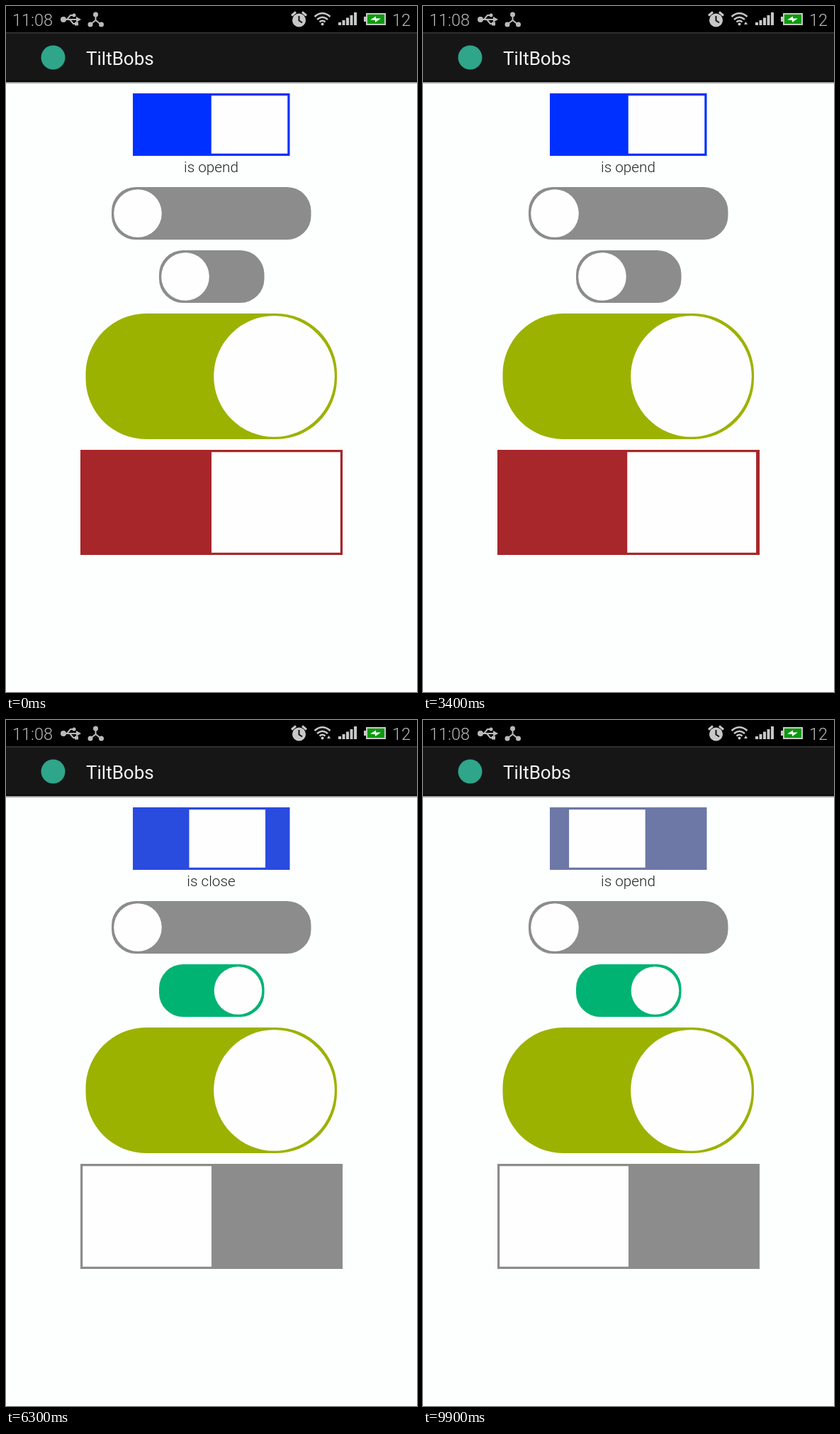
Animation, 580 px wide and 966 px high, one loop 10 s. Source, as an HTML page:

```html
<!DOCTYPE html>
<html lang="en">
<head>
<meta charset="utf-8">
<title>Toggle buttons</title>
<style>
  html, body { margin: 0; width: 100%; height: 100%; overflow: hidden; background: #fdfefe; }
  svg { display: block; width: 100vw; height: 100vh; }
  text { font-family: Roboto, "Open Sans", sans-serif; font-weight: 300; }
</style>
</head>
<body>
<svg viewBox="0 0 580 966">
  <defs>
    <linearGradient id="shade" x2="0" y2="1">
      <stop offset="0" stop-color="#777"/>
      <stop offset="1" stop-color="#fdfefe"/>
    </linearGradient>
  </defs>
  <rect width="580" height="966" fill="#fdfefe"/>
  <rect width="580" height="38" fill="#000"/>
  <rect y="38" width="580" height="69" fill="#161616"/>
  <rect y="37" width="580" height="1.5" fill="#383838"/>
  <rect y="105" width="580" height="2" fill="#0a0a0a"/>
  <rect y="107" width="580" height="3" fill="url(#shade)"/>

  <g fill="#bababa" font-size="23.5">
    <text x="9" y="28">11:08</text>
    <text x="545" y="28">12</text>
  </g>

  <g stroke="#bababa" stroke-width="2" fill="none">
    <path d="M82 19H100M86 19L91 13H95M90 19L95 25H98"/>
    <path d="M126.5 13V20L119 26M126.5 20L134 26"/>
  </g>
  <g fill="#bababa">
    <circle cx="81" cy="19" r="4"/>
    <path d="M99 15L106 19L99 23Z"/>
    <circle cx="96" cy="13" r="2.5"/>
    <rect x="97" y="22.5" width="5" height="5"/>
    <circle cx="126.5" cy="12" r="3.5"/>
    <circle cx="119" cy="26" r="3.5"/>
    <circle cx="134.5" cy="26" r="3.5"/>
  </g>

  <g stroke="#c8c8c8" fill="none">
    <circle cx="413.5" cy="20" r="9.5" fill="#c8c8c8" stroke="none"/>
    <path d="M403 13.5L409 8.5M424 13.5L418 8.5" stroke-width="3"/>
    <path d="M413.5 14V20.5L418 23.5" stroke="#111" stroke-width="2"/>
    <path d="M435.5 15Q446.500 5.500 457.500 15M439 19Q446.500 12.500 454 19M442.500 22.500Q446.500 19 450.500 22.500" stroke-width="2.500"/>
    <circle cx="446.500" cy="25.500" r="2" fill="#c8c8c8" stroke="none"/>
  </g>
  <path id="traffic" fill="#c8c8c8"/>
  <g id="bars" fill="#c8c8c8"></g>
  <path d="M505 15H508V10H536V27H508V22H505Z" fill="#c8c8c8"/>
  <rect x="510" y="12" width="24" height="13" fill="#0a9a0a"/>
  <path d="M514 19.500L522 14.500V17.500H529L521 23V20Z" fill="#fff"/>

  <circle cx="66.500" cy="72.500" r="17" fill="#2fa58a"/>
  <text x="113" y="83" font-size="26" fill="#f3f3f3" style="font-weight:400">TiltBobs</text>

  <g id="toggles"></g>
  <text id="label" x="289.500" y="234" font-size="20.700" fill="#222" text-anchor="middle"></text>
</svg>
<script>
const LOOP = 10000, STEP = 100, SLIDE = 320, PAD = 3.2;
const OFF = [140, 140, 140];
const $ = id => document.getElementById(id);

// flips: times at which the switch starts sliding to its other side
const toggles = [
  { x: 179, y: 123, w: 221.5, h: 88, color: [0, 48, 255], on: 1, flips: [5580, 6096, 9680] },
  { x: 149, y: 255, w: 281.5, h: 74, color: [0, 80, 0], on: 0, round: true, flips: [7180, 7640, 8080, 8780] },
  { x: 216, y: 344, w: 148.5, h: 74, color: [0, 179, 115], on: 0, round: true, flips: [4180] },
  { x: 112.5, y: 433, w: 354.5, h: 177, color: [156, 178, 0], on: 1, round: true, flips: [1180, 2380] },
  { x: 105, y: 625, w: 370, h: 148, color: [167, 38, 42], on: 1, flips: [3380] }
];

function add(parent, tag, attrs) {
  const el = document.createElementNS("http://www.w3.org/2000/svg", tag);
  set(el, attrs);
  parent.appendChild(el);
  return el;
}

function set(el, attrs) {
  for (const key in attrs) el.setAttribute(key, attrs[key]);
}

[4, 7, 10.5, 14, 18].forEach((height, i) =>
  add($("bars"), "rect", { x: 469 + i * 5.5, y: 27 - height, width: 4, height }));

for (const s of toggles) {
  const inner = s.h - 2 * PAD;
  s.size = s.round ? inner : s.w / 2 - PAD;
  s.body = add($("toggles"), "rect", { x: s.x, y: s.y, width: s.w, height: s.h, rx: s.round ? inner / 2 : 0 });
  s.knob = add($("toggles"), "rect", {
    y: s.y + PAD, width: s.size, height: inner, rx: s.round ? inner / 2 : 0, fill: "#fefefe"
  });
}

function position(s, t) {
  let value = s.on;
  for (const start of s.flips) {
    if (t < start) break;
    const p = Math.min(1, (t - start) / SLIDE);
    const eased = (1 - Math.cos(Math.PI * p)) / 2;
    value = value > 0.5 ? 1 - eased : eased;
  }
  return value;
}

function draw(time) {
  const t = Math.floor(time % LOOP / STEP) * STEP;
  for (const s of toggles) {
    const p = position(s, t);
    const mix = OFF.map((c, i) => Math.round(c + (s.color[i] - c) * p));
    set(s.body, { fill: `rgb(${mix})` });
    set(s.knob, { x: s.x + PAD + p * (s.w - 2 * PAD - s.size) });
  }
  const [close, open] = toggles[0].flips;
  const closed = t >= close + SLIDE && t < open + SLIDE;
  $("label").textContent = closed ? "is close" : "is opend";

  const down = t >= 4200 && t < 4900;
  set($("traffic"), { d: t < 2400 ? "" : down ? "M453 24H458L455.5 28Z" : "M453 26H458L455.5 22Z" });
}

function tick() {
  draw(performance.now());
  requestAnimationFrame(tick);
}
tick();
</script>
</body>
</html>
```
